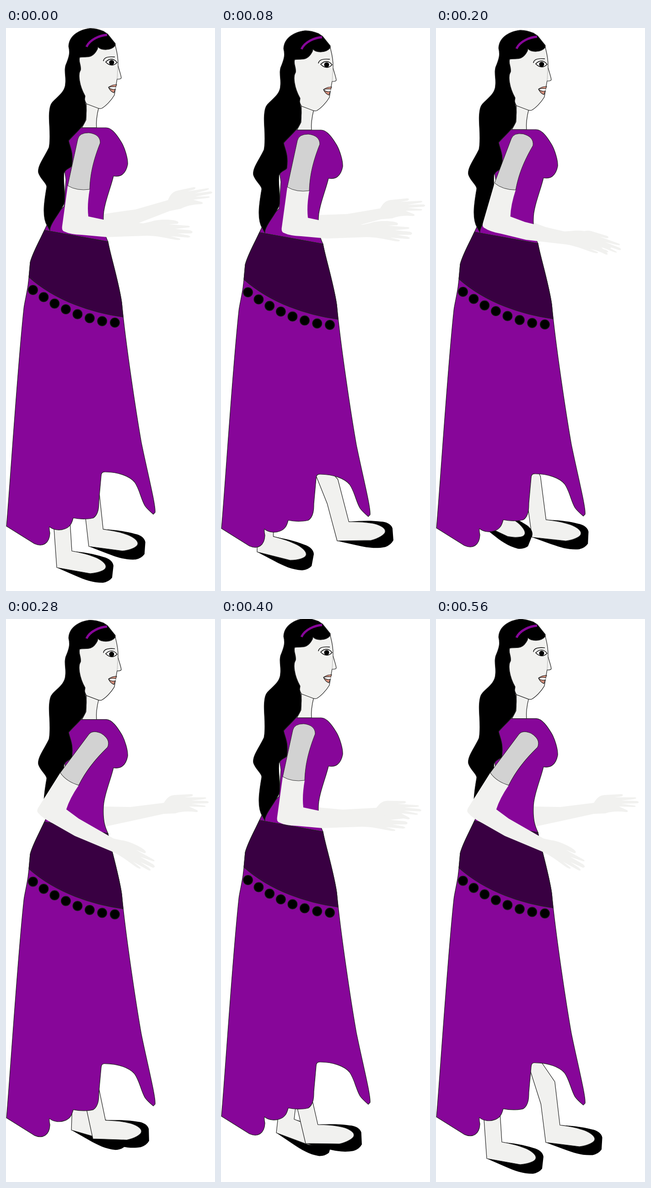
An HTML page that plays this animation: 457x1225 px, repeating every 0.6 s.

```html
<!DOCTYPE html>
<html lang="en">
<head>
<meta charset="utf-8">
<title>Walking woman</title>
<style>
  html, body { margin: 0; width: 100%; height: 100%; overflow: hidden; background: #fff; }
  svg { display: block; width: 100%; height: 100%; }
  .skin { fill: #f1f1ef; }
  .dress { fill: #870699; }
  .line { stroke: #222; stroke-width: 1.2; stroke-linejoin: round; }
</style>
</head>
<body>
<svg viewBox="0 0 457 1225">
  <path id="farArm" class="skin" d="M190 408H213L272 409 345 400C350 393 355 384 368 383L405 381Q412 382 406 386L390 388 435 388Q442 390 432 392L405 395 440 396Q447 399 440 401L405 402 435 406Q440 409 430 409L400 408 418 416Q422 420 415 420C400 418 385 418 370 423L345 424 220 451 190 455Z"/>
  <g id="farLeg"></g>
  <g id="nearLeg"></g>

  <g id="body">
    <path class="skin line" d="M176 160L175 200 166 217H198Q196 200 203 172Z"/>
    <path class="skin line" d="M239 38C243 53 246 66 245 82C248 94 252 103 252 109Q250 112 243 111L240 128 237 146C230 158 218 170 209 175Q204 176 200 174L176 165 168 150 150 120 150 60 205 36Z"/>
    <path d="M245 72L243 112" fill="none" stroke="#999" stroke-width=".7"/>

    <path class="dress line" d="M163 217H219C232 217 244 235 252 248S267 285 266 297C262 318 250 325 235 322C230 345 213 385 213 410C212 440 217 452 223 465L84 440 92 423 127 388 131 330 128 308 137 245Z"/>
    <path class="dress line" d="M84 440C70 470 58 490 53 510L50 543 48 560C45 580 40 600 39 610C25 740 10 980 1 1084L62 1122C80 1130 95 1122 96 1099Q94 1090 95 1085C105 1094 120 1093 128 1090C140 1086 144 1078 147 1066C165 1070 185 1068 191 1066C203 1058 203 1040 203 1030L208 975Q208 965 217 966C245 966 270 975 281 988C292 1003 295 1025 304 1040Q309 1047 322 1058L326 1054C328 1040 310 970 296 902C285 840 262 690 253 597C246 550 227 490 223 465Z"/>
    <path class="line" fill="#390042" d="M84 440L223 465C227 490 246 550 253 597L256 629C190 620 110 595 50 542L53 510C58 490 70 470 84 440Z"/>
    <g id="beads" class="line"></g>

    <path class="line" d="M213 7Q195 0 182 1C165 3 138 14 137 40C140 52 139 60 133 75C125 90 132 105 130 120C130 145 100 155 97 170C90 195 100 230 94 260C85 280 68 300 71 315C76 330 90 338 89 346C84 375 78 410 90 430L96 441C95 425 125 395 128 378C130 350 124 335 127 315C132 305 142 305 144 300C148 270 140 260 137 245C150 230 170 215 174 200C178 175 174 165 172 155L173 148C160 125 157 100 163 92C165 80 158 75 161 64C175 61 188 69 200 46L201 41C208 49 230 50 239 38V34L222 13Z"/>
    <path d="M176 41C183 25 205 16 221 15" fill="none" stroke="#870699" stroke-width="5"/>

    <path d="M213 72C214 62 228 62 238 63" fill="none" stroke="#000" stroke-width="1.4"/>
    <path d="M218 74Q231 61 243 75Q231 87 218 74Z" fill="#fff" stroke="#000" stroke-width="1.4"/>
    <circle cx="231" cy="75" r="5.5"/>
    <path d="M224 129L241 124 238 138Z" fill="#fff"/>
    <path class="line" fill="#d6907d" d="M224 129Q232 123 242 123L240 128Q232 127 224 129ZM224 129Q228 138 236 141L239 133Q230 135 224 129Z"/>
  </g>

  <g id="nearArm">
    <path class="skin" d="M135 343L123 430Q121 441 128 443Q140 449 165 450L221 455 308 452C330 452 345 456 372 461Q384 462 380 458L360 453 398 456Q408 455 398 451L375 447 405 447Q412 443 402 440L370 437 400 434Q406 431 395 430L355 427 375 426Q381 422 370 419C350 415 325 418 318 421L300 425 213 417 180 410Q177 385 183 351Z"/>
    <path class="line" style="stroke-width:.9" fill="#d2d2d2" d="M135 343L157 242Q160 228 181 228Q206 231 206 250C190 290 184 320 183 351Q155 355 135 343Z"/>
  </g>
</svg>
<script>
const FRAME_MS = 40, FRAMES = 15, STEP = 7, BEADS = 8;
const HIP_BACK = [186, 920], HIP_FRONT = [200, 920];
const SHOE = "M0 0L39 17C62 27 78 33 101 33Q114 31 121 22L124 -4C123 -14 112 -21 102 -23C80 -30 60 -33 33 -36Z";
const FOOT = "L0 0 73 13C90 12 106 6 107 0C110 -8 95 -19 80 -24C65 -30 50 -33 33 -36L27 -131";

// Key points: frame, then the values reached there.
const BOB = [[0, 0], [2, 5], [5, 4], [10, -2], [15, 0]];
const ARM_SWING = [[0, 0], [2, 0], [5, 8.5], [7, 24.5], [10, 0], [14, 24.5]];
const ARM_HOP = [[0, 0], [3, 4], [5, 20], [7, 0]];
const NEAR_HEEL = [[0, 111, 1174], [2, 79, 1140], [5, 90, 1075], [7, 190, 1131], [10, 185, 1141], [12, 142, 1148], [14, 111, 1174]];
const FAR_HEEL = [[0, 181, 1128], [2, 254, 1116], [5, 210, 1108], [7, 143, 1112], [10, 121, 1118], [12, 198, 1134], [14, 240, 1139]];

const el = id => document.getElementById(id);
const place = (id, transform) => el(id).setAttribute("transform", transform);

// Straight-line motion through key points.
function track(frame, points) {
  const i = Math.max(1, points.findIndex(p => p[0] >= frame));
  const [t0, ...from] = points[i - 1], [t1, ...to] = points[i];
  return from.map((v, n) => v + (to[n] - v) * (frame - t0) / (t1 - t0));
}

// Beads hang along a curve that flattens towards the front.
for (let i = 0; i < BEADS; i++) {
  const u = i / (BEADS - 1);
  const x = 59 + 179 * u - 5 * Math.sin(Math.PI * u);
  const y = 570 + 71 * (1 - (1 - u) ** 1.6);
  el("beads").innerHTML += `<circle cx="${x}" cy="${y}" r="10.5"/>`;
}

for (const id of ["farLeg", "nearLeg"]) {
  el(id).innerHTML = `<path d="${SHOE}"/><path class="skin line"/>`;
}

// The hip stays put, so it is converted into the turned foot's coordinates.
function drawLeg(id, x, y, angle) {
  const r = angle * Math.PI / 180, c = Math.cos(r), s = Math.sin(r);
  const local = ([px, py]) => `${(px - x) * c + (py - y) * s} ${(py - y) * c - (px - x) * s}`;
  place(id, `translate(${x} ${y}) rotate(${angle})`);
  el(id).lastChild.setAttribute("d", `M${local(HIP_BACK)}L-6 -84${FOOT}L${local(HIP_FRONT)}Z`);
}

// The shoulder slides forward and down as the near arm swings back.
function drawArms(frame) {
  const [swing] = track(frame, ARM_SWING);
  const sway = 10 * Math.max(0, 1 - Math.abs(frame - 2) / 2);
  const x = .7 * swing + sway, y = .032 * swing ** 2 + .3 * sway;
  place("nearArm", `translate(${x} ${y}) rotate(${swing} 182 252)`);

  const [hop] = track(frame % STEP, ARM_HOP);
  const raise = Math.max(0, 9 - 1.8 * frame);
  place("farArm", `rotate(${hop - raise} 187 330)`);
}

function drawLegs(frame) {
  const [nearX, nearY] = track(frame, NEAR_HEEL);
  const [farX, farY] = track(frame, FAR_HEEL);
  const lift = Math.max(0, 1140 - nearY);
  drawLeg("nearLeg", nearX, nearY, (111 - nearX) * .125 + lift * .19);
  drawLeg("farLeg", farX, farY, (162 - farX) * .13 + frame * .5);
}

function draw(ms) {
  const frame = Math.floor(ms / FRAME_MS) % FRAMES;
  place("body", `translate(0 ${track(frame, BOB)[0]})`);
  drawArms(frame);
  drawLegs(frame);
}

const start = performance.now();
function tick() {
  draw(performance.now() - start);
  requestAnimationFrame(tick);
}
tick();
</script>
</body>
</html>
```
